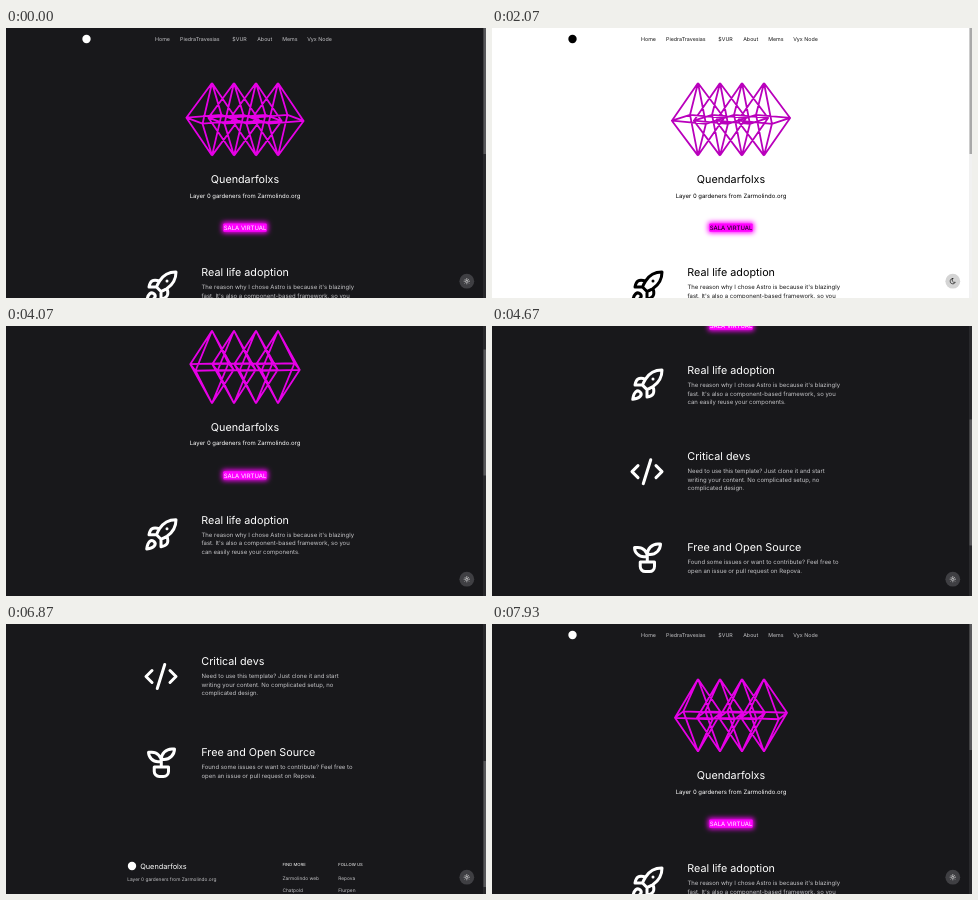
Recreate the animation shown at these times as an HTML page. Size 480 px wide and 270 px high, loop 8 s.

```html
<!DOCTYPE html>
<html lang="en">
<head>
<meta charset="utf-8">
<title>Landing page</title>
<style>
  html, body { margin: 0; width: 100%; height: 100%; overflow: hidden; }
  svg {
    --bg: #18181b; --ink: #fff; --soft: #c4c4c7; --wire: #e600e6;
    --track: #28282b; --thumb: #58585b; --knob: #3f3f43;
    display: block; width: 100vw; height: 100vh; background: var(--bg);
    font-family: Inter, sans-serif; text-rendering: geometricPrecision;
  }
  svg.light {
    --bg: #fff; --ink: #000; --soft: #161616; --wire: #b900bc;
    --track: #f1f1f1; --thumb: #a8a8a8; --knob: #d4d4d4;
  }
  text, .logo { fill: var(--ink); }
  .soft { fill: var(--soft); }
  .mid { text-anchor: middle; }
  .icon { fill: none; stroke: var(--ink); stroke-width: 2; stroke-linecap: round; stroke-linejoin: round; }
  #wire { fill: none; stroke: var(--wire); stroke-width: 1.8; stroke-linejoin: round; }
  .light #sun, #moon { display: none; }
  .light #moon { display: inline; }
</style>
</head>
<body>
<svg id="stage" viewBox="0 0 480 270">
  <defs>
    <filter id="glow" x="-30%" y="-150%" width="160%" height="400%"><feGaussianBlur stdDeviation="2.9"/></filter>
  </defs>
  <g id="page">
    <circle class="logo" cx="80.5" cy="11" r="4.2"/>
    <path id="wire"/>
    <rect x="216" y="194" width="46" height="11" rx="2" fill="#f0f" filter="url(#glow)"/>
    <rect x="217.3" y="195.5" width="43.4" height="8.2" rx="1" fill="#f0f"/>
    <circle class="logo" cx="126" cy="535" r="4.2"/>
  </g>
  <rect x="477" width="3" height="270" fill="var(--track)"/>
  <rect id="thumb" x="477.5" width="2.5" height="126" fill="var(--thumb)"/>
  <circle cx="460.8" cy="253.2" r="7.4" fill="var(--knob)"/>
  <g class="icon" transform="translate(457.2 249.6) scale(.3)">
    <path id="sun" d="M12 8a4 4 0 1 0 0 8a4 4 0 1 0 0-8M3 12h1m8-9v1m8 8h1m-9 8v1m-6.4-15.4l.7.7m12.1-.7l-.7.7m0 11.4l.7.7m-12.1-.7l-.7.7"/>
    <path id="moon" d="M12 3h.393a7.5 7.5 0 0 0 7.92 12.446a9 9 0 1 1-8.313-12.454z"/>
  </g>
</svg>
<script>
const byId = id => document.getElementById(id);
const [stage, page, wire, thumb] = ['stage', 'page', 'wire', 'thumb'].map(byId);

function add(tag, attributes, content = '') {
  const node = document.createElementNS('http://www.w3.org/2000/svg', tag);
  for (const name in attributes) node.setAttribute(name, attributes[name]);
  node.textContent = content;
  page.append(node);
}
const label = (x, y, size, content, cls = '') =>
  add('text', { x, y, 'font-size': size, class: cls }, content);

function feature(y, iconY, icon, title, lines) {
  add('path', { class: 'icon', d: icon, transform: `translate(155 ${iconY}) scale(1.5) translate(-12 -12)` });
  label(195.3, y, 10.78, title);
  lines.forEach((line, i) => label(195.5, y + 13.2 + i * 8.4, 5.96, line, 'soft'));
}

const brand = 'Quendarfolxs', tagline = 'Layer 0 gardeners from Zarmolindo.org';

[[149, 'Home'], [174, 'PiedraTravesias'], [226.3, '$VUR'], [251.2, 'About'], [276.2, 'Mems'], [301.2, 'Vyx Node']]
  .forEach(([x, name]) => label(x, 13.4, 5.33, name, 'soft'));
label(239, 155.2, 10.78, brand, 'mid');
label(239, 169.7, 5.96, tagline, 'mid');
label(239, 201.9, 6, 'SALA VIRTUAL', 'mid');

const rocket = 'M4.5 16.5c-1.5 1.26-2 5-2 5s3.74-.5 5-2c.71-.84.7-2.13-.09-2.91a2.18 2.18 0 0 0-2.91-.09z'
  + 'M12 15l-3-3a22 22 0 0 1 2-3.95A12.88 12.88 0 0 1 22 2c0 2.72-.78 7.5-6 11a22.35 22.35 0 0 1-4 2z'
  + 'M9 12H4s.55-3.03 2-4c1.62-1.08 5 0 5 0M12 15v5s3.03-.55 4-2c1.08-1.62 0-5 0-5M16 8h.01';
const code = 'M18 16l4-4l-4-4M6 8l-4 4l4 4M14.5 4l-5 16';
const plant = 'M7.5 15h9.5v3a3.3 3.3 0 0 1-3.3 3.3h-2.9a3.3 3.3 0 0 1-3.3-3.3zM12.2 15v-5'
  + 'M12.2 11.5h-2.2a6.3 6.3 0 0 1-6.3-6.3h2.2a6.3 6.3 0 0 1 6.3 6.3M12.2 10a7 7 0 0 1 7-7h1.8a7 7 0 0 1-7 7z';

feature(248, 259, rocket, 'Real life adoption',
  ["The reason why I chose Astro is because it's blazingly", "fast. It's also a component-based framework, so you", 'can easily reuse your components.']);
feature(334.2, 345.6, code, 'Critical devs',
  ['Need to use this template? Just clone it and start', 'writing your content. No complicated setup, no', 'complicated design.']);
feature(425, 431.5, plant, 'Free and Open Source',
  ['Found some issues or want to contribute? Feel free to', 'open an issue or pull request on Repova.']);

label(134.2, 538.4, 7.33, brand);
label(121.2, 549.7, 4.8, tagline, 'soft');
label(276.5, 534.6, 4.2, 'FIND MORE');
label(332.2, 534.6, 4.2, 'FOLLOW US');
[[276.5, 'Zarmolindo web', 'Chatpold'], [332.2, 'Repova', 'Flurpen']].forEach(([x, first, second]) => {
  label(x, 548.7, 4.8, first, 'soft');
  label(x, 560.7, 4.8, second, 'soft');
});

// Four octahedra turning together, seen slightly from above.
function octahedra(degrees) {
  let d = '';
  for (const cx of [206, 228, 250, 272]) {
    const corners = [0, 1, 2, 3].map(i => {
      const a = (degrees + i * 90) * Math.PI / 180;
      return `${(cx + 27.3 * Math.cos(a)).toFixed(2)} ${(91.3 + 4.7 * Math.sin(a)).toFixed(2)}`;
    });
    d += `M${corners.join('L')}Z`;
    for (const p of corners) d += `M${cx} 55L${p}L${cx} 127.6`;
  }
  return d;
}

const LOOP = 8000, STEP = 1000 / 15;
const scrollKeys = [[0, 0], [3867, 0], [4133, 67], [4400, 133], [4667, 200], [4800, 205], [5000, 205],
  [5267, 267], [5467, 267], [5733, 308], [6800, 308], [6867, 293], [7533, 0], [LOOP, 0]];

function scrollAt(t) {
  const i = scrollKeys.findIndex(([time]) => time > t);
  const [t0, s0] = scrollKeys[i - 1], [t1, s1] = scrollKeys[i];
  return s0 + (s1 - s0) * (t - t0) / (t1 - t0);
}

function draw(now) {
  // The picture advances at 15 steps per second.
  const t = Math.floor(((now % LOOP) + 5) / STEP) * STEP % LOOP;
  const scroll = scrollAt(t);
  stage.classList.toggle('light', t > 1500 && t < 2190);
  page.setAttribute('transform', `translate(0 ${-scroll.toFixed(2)})`);
  thumb.setAttribute('y', scroll * 144 / 308);
  wire.setAttribute('d', octahedra(20.3 - 0.018 * t));
}

const start = performance.now();
function tick() {
  draw(performance.now() - start);
  requestAnimationFrame(tick);
}
tick();
</script>
</body>
</html>
```
